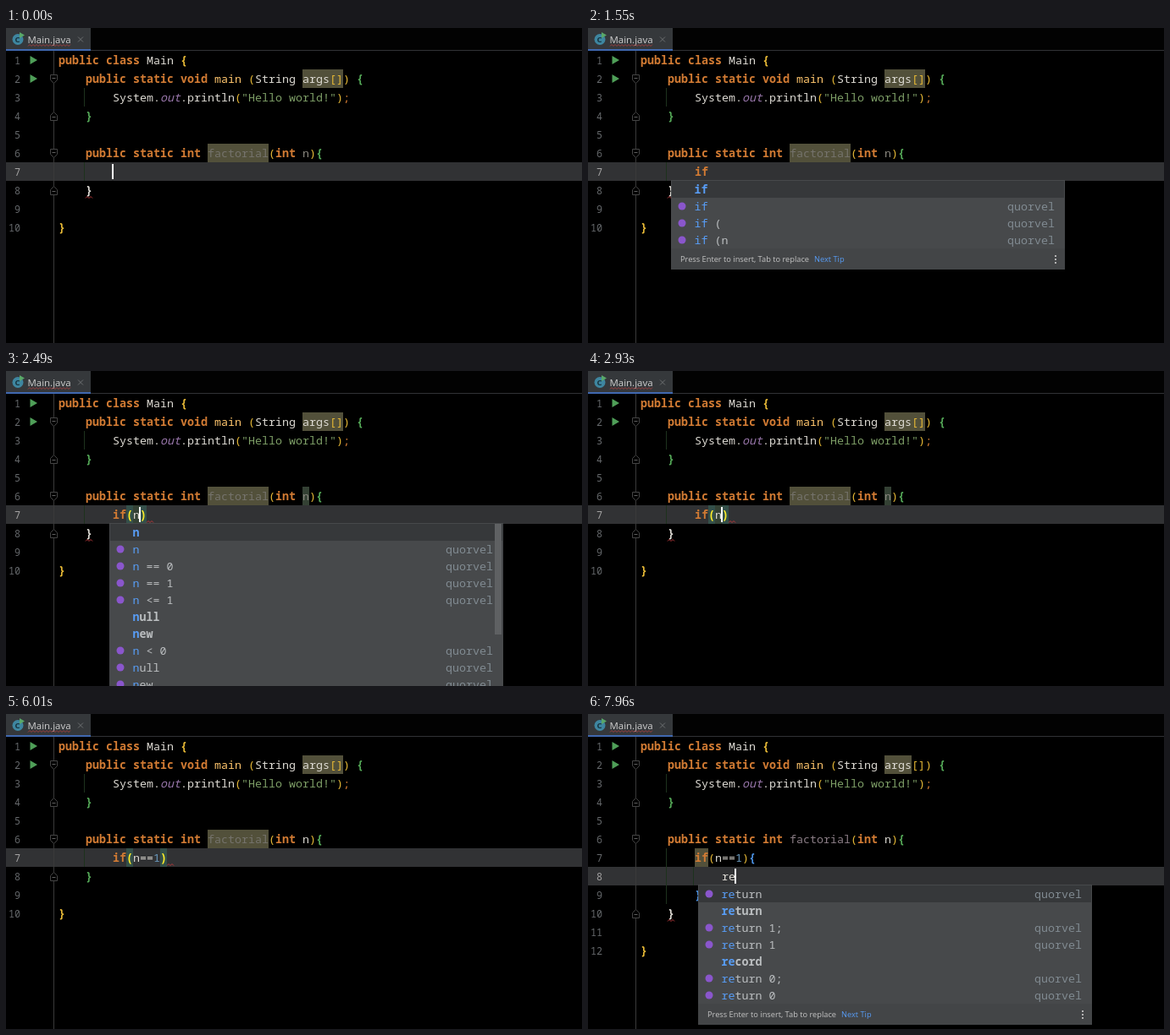
An HTML page with a canvas that plays this animation: 680 px wide and 373 px high, repeating every 8000 ms.

```html
<!DOCTYPE html>
<html lang="en">
<head>
<meta charset="utf-8">
<title>Typing a factorial</title>
<style>
html, body { margin: 0; width: 100%; height: 100%; overflow: hidden; background: #000; }
canvas { display: block; }
</style>
</head>
<body>
<canvas id="stage" width="680" height="373"></canvas>
<script>
const ctx = document.getElementById('stage').getContext('2d');
const LOOP = 8000, CELL = 8, LEFT = 62;
const MONO = '"Noto Sans Mono", "DejaVu Sans Mono", monospace';
const SANS = '"Open Sans", "Noto Sans", sans-serif';
const C = {
  text: '#dedbd4', keyword: '#d27b33', method: '#ffc66d', field: '#9876aa', string: '#7d9e66',
  number: '#6897bb', gold: '#e8ba36', green: '#54a857', blue: '#4a90e2', unused: '#75736c',
  match: '#ffef28', matchBg: '#34504a', warnBg: '#52503a', error: '#b5383a'
};

const xOf = col => LEFT + col * CELL;
const yOf = row => 38 + (row - 1) * 22;
const latest = (t, steps) => steps.filter(s => s[0] <= t).pop()[1];

function box(x, y, w, h, color) {
  ctx.fillStyle = color;
  ctx.fillRect(x, y, w, h);
}

function label(text, x, y, color, font, align = 'left') {
  ctx.font = font;
  ctx.fillStyle = color;
  ctx.textAlign = align;
  ctx.fillText(text, x, y);
}

function mono(text, x, y, color, style = '') {
  label(text, x, y + 5, color, `${style} 13.333px ${MONO}`);
}

function path(points, color, fill = false, close = fill) {
  ctx.beginPath();
  points.forEach(([x, y]) => ctx.lineTo(x, y));
  if (close) ctx.closePath();
  ctx[fill ? 'fillStyle' : 'strokeStyle'] = color;
  ctx.lineWidth = 1;
  fill ? ctx.fill() : ctx.stroke();
}

function disc(x, y, r, color) {
  ctx.beginPath();
  ctx.arc(x, y, r, 0, Math.PI * 2);
  ctx.fillStyle = color;
  ctx.fill();
}

function wave(x, y, width, color = C.error) {
  const points = [];
  for (let i = 0; i <= width; i += 2) points.push([x + i, y + (i % 4 ? -1 : 1)]);
  path(points, color);
}

const mark = (row, col, count, color) => box(xOf(col), yOf(row) - 11, count * CELL, 22, color);
const squiggle = (row, col) => wave(xOf(col), yOf(row) + 8.5, 8);

// Each run is [text, color, font style], set one after another.
function line(row, col, ...runs) {
  for (const [text, color, style] of runs) {
    mono(text, xOf(col), yOf(row), color, style);
    col += text.length;
  }
}
const kw = text => [text, C.keyword, 'bold'];
const brace = (text, color) => [text, color, 'bold'];

function fold(row, opens) {
  const y = yOf(row) + 0.5, s = opens ? 1 : -1;
  const shape = [[52.5, y - 5 * s], [60.5, y - 5 * s], [60.5, y + s], [56.5, y + 5 * s], [52.5, y + s]];
  path(shape, '#000', true);
  path(shape, '#444', false, true);
  path([[54.5, y - s], [58.5, y - s]], '#606060');
}

function tabBar() {
  box(0, 0, 680, 26, '#020202');
  box(0, 0, 100, 26, '#35383b');
  box(0, 26, 680, 1, '#303235');
  box(0, 25, 100, 2, '#4068b0');
  disc(14, 13.5, 6.5, '#3e86a0');
  label('C', 13.5, 17, '#17323d', `bold 9.5px ${SANS}`, 'center');
  path([[16, 5], [22, 8.5], [16, 12]], '#59a869', true);
  label('Main.java', 25.5, 18, '#d0d0d0', `11.45px ${SANS}`);
  wave(26, 20.5, 51, '#a04040');
  path([[85, 10.5], [91, 16.5]], '#6b6e70');
  path([[91, 10.5], [85, 16.5]], '#6b6e70');
}

function gutter(t, rows, current, closeRow) {
  box(56, 27, 1, 346, '#3a3a3a');
  for (let n = 1; n <= rows; n++) {
    label(n, 17, yOf(n) + 5, n === current ? '#a4a3a3' : '#65686b', `11.7px ${MONO}`, 'right');
  }
  for (const row of [1, 2]) {
    const y = yOf(row);
    path([[28.5, y - 5], [37, y], [28.5, y + 5]], '#4f9f58', true);
  }
  fold(2, true);
  fold(4, false);
  fold(6, true);
  if (t < 6350 || t >= 7030) fold(closeRow, false);
}

const statement = [[0, ''], [700, 'i'], [900, 'if'], [2020, 'if()'], [2320, 'if(n)'], [2960, 'if(n=)'],
  [3060, 'if(n==)'], [3860, 'if(n==1)'], [6350, 'if(n==1){']];
const result = [[0, ''], [7360, 'r'], [7890, 're']];
const caret = [[0, [7, 8]], [700, [7, 9]], [900, [7, 10]], [2020, [7, 11]], [2320, [7, 12]], [2960, [7, 13]],
  [3060, [7, 14]], [3860, [7, 15]], [5030, [7, 16]], [6350, [7, 17]], [7030, [8, 12]], [7360, [8, 13]], [7890, [8, 14]]];
const caretShown = [[0, true], [30, false], [530, true], [1550, false], [2020, true], [6010, false], [6350, true]];
const statementErrors = [[0, []], [2490, [13]], [2960, []], [3390, [14, 15]], [3860, [15, 16]], [4190, [16]], [6350, []]];

// A leading "!" makes a plain keyword row; the others carry the provider's name.
const iList = { row: 7, col: 8, typed: 1, height: 165, scroll: true,
  items: ['!if', '!int', 'int', 'if', 'import', 'interface', 'implements', '!interface', '!implements'] };
const popups = [
  [0, null],
  [770, iList],
  [810, { ...iList, footer: true }],
  [950, { row: 7, col: 8, typed: 2, height: 105, footer: true, items: ['!if', 'if', 'if (', 'if (n'] }],
  [2020, null],
  [2390, { row: 7, col: 11, typed: 1, height: 205, scroll: true,
    items: ['!n', 'n', 'n == 0', 'n == 1', 'n <= 1', '!null', '!new', 'n < 0', 'null', 'new'] }],
  [2930, null],
  [7520, { row: 8, col: 12, typed: 1, height: 185, scroll: true,
    items: ['return', '!return', 'return 1;', 'return 1', '!record', 'return 0;', 'return 0', 'return n;', 'return n'] }],
  [7930, { row: 8, col: 12, typed: 2, height: 165, footer: true,
    items: ['return', '!return', 'return 1;', 'return 1', '!record', 'return 0;', 'return 0'] }]
];

function popup({ row, col, typed, height, items, footer, scroll }) {
  const x = xOf(col) - 28, y = yOf(row) + 11, width = 465;
  ctx.save();
  ctx.beginPath();
  ctx.rect(x, y - 1, width, height + 1);
  ctx.clip();
  box(x, y - 1, width, height + 1, '#47494b');
  box(x + 1, y, width - 2, 20, '#36383a');
  items.forEach((item, i) => {
    const plain = item[0] === '!', text = plain ? item.slice(1) : item;
    const mid = y + 10 + i * 20, style = plain ? 'bold' : '';
    mono(text.slice(0, typed), x + 27.5, mid, '#589df6', style);
    mono(text.slice(typed), x + 27.5 + typed * CELL, mid, '#bbbec0', style);
    if (!plain) {
      disc(x + 13, mid, 4.5, '#8a56cc');
      mono('quorvel', x + 397, mid, '#808a91');
    }
  });
  if (scroll) box(x + 455, y, 8, 131, '#5f6163');
  if (footer) {
    const top = y + height - 25;
    box(x, top, width, 25, '#434547');
    label('Press Enter to insert, Tab to replace', x + 11, top + 16, '#c4c4c4', `9.25px ${SANS}`);
    label('Next Tip', x + 169, top + 16, '#589df6', `9.25px ${SANS}`);
    for (const dy of [8, 12, 16]) box(x + 453, top + dy, 2, 2, '#b4b4b4');
  }
  ctx.restore();
}

function bulb() {
  disc(76, 165.5, 4, '#d9a93c');
  box(74, 169, 4, 2, '#d9a93c');
  box(74, 172, 4, 1, '#9a9a9a');
}

function statementLine(t, code) {
  const matching = t >= 2020 && t < 6350;
  const isIf = code.startsWith('if');
  if (t >= 7390) mark(7, 8, 2, C.warnBg);
  if (t >= 2320 && t < 2960) mark(7, 11, 1, '#344134');
  line(7, 8, isIf ? kw('if') : [code, C.text]);
  [...code].forEach((ch, i) => {
    if (!isIf || i < 2) return;
    const round = ch === '(' || ch === ')', curly = ch === '{';
    const lit = round && matching || curly && t < 7030;
    if (lit) mark(7, 8 + i, 1, C.matchBg);
    const color = lit ? C.match : round ? C.gold : ch === '1' ? C.number : curly ? C.blue : C.text;
    line(7, 8 + i, [ch, color, lit || curly ? 'bold' : '']);
  });
  latest(t, statementErrors).forEach(col => squiggle(7, col));
}

function draw(t) {
  const entered = t >= 7030, reparsed = t >= 6730;
  const closeRow = entered ? 10 : 8, lastRow = entered ? 12 : 10;
  const [caretRow, caretCol] = latest(t, caret);

  box(0, 0, 680, 373, '#000');
  box(0, yOf(caretRow) - 11, 680, 22, '#313234');
  tabBar();
  gutter(t, lastRow, caretRow, closeRow);
  box(92, 71, 1, 22, '#1d321d');
  box(92, 159, 1, entered ? 66 : 22, '#1d321d');
  if (entered) box(124, 181, 1, 22, '#1d321d');

  line(1, 0, kw('public class '), ['Main ', C.text], brace('{', C.gold));

  mark(2, 36, reparsed ? 4 : 6, C.warnBg);
  line(2, 4, kw('public static void '), ['main ', C.method], ['(', C.gold], ['String args', C.text],
    ['[]) ', C.gold], brace('{', C.green));
  line(3, 8, ['System.', C.text], ['out', C.field, 'italic'], ['.println', C.text], ['(', C.gold],
    ['"Hello world!"', C.string], [')', C.gold], [';', C.keyword]);
  line(4, 4, brace('}', C.green));

  if (!reparsed) mark(6, 22, 9, C.warnBg);
  if (t >= 2320 && t < 2960) mark(6, 36, 1, '#344134');
  line(6, 4, kw('public static int '), ['factorial', reparsed ? '#8b7d86' : C.unused], ['(', C.gold], kw('int '),
    ['n', t < 3390 ? '#8b8880' : C.text], [')', C.gold], brace('{', C.green));

  statementLine(t, latest(t, statement));
  if (t >= 4730 && t < 5030) bulb();

  if (entered) {
    line(8, 12, [latest(t, result), C.text]);
    line(9, 8, brace('}', C.blue));
  }
  const opened = t >= 6350 && !entered;
  if (opened) mark(closeRow, 4, 1, C.matchBg);
  line(closeRow, 4, brace('}', opened ? C.match : t >= 3390 && !entered ? C.green : C.text));
  if (t < 3390 || t >= 7390) squiggle(closeRow, 4);
  line(lastRow, 0, brace('}', C.gold));
  if (reparsed && t < 7390) squiggle(lastRow, 0);

  if (latest(t, caretShown)) box(xOf(caretCol) - 1, yOf(caretRow) - 9, 2, 18, '#fff');
  const list = latest(t, popups);
  if (list) popup(list);
}

const start = performance.now();
function frame() {
  draw((performance.now() - start) % LOOP);
  requestAnimationFrame(frame);
}
frame();
</script>
</body>
</html>
```
